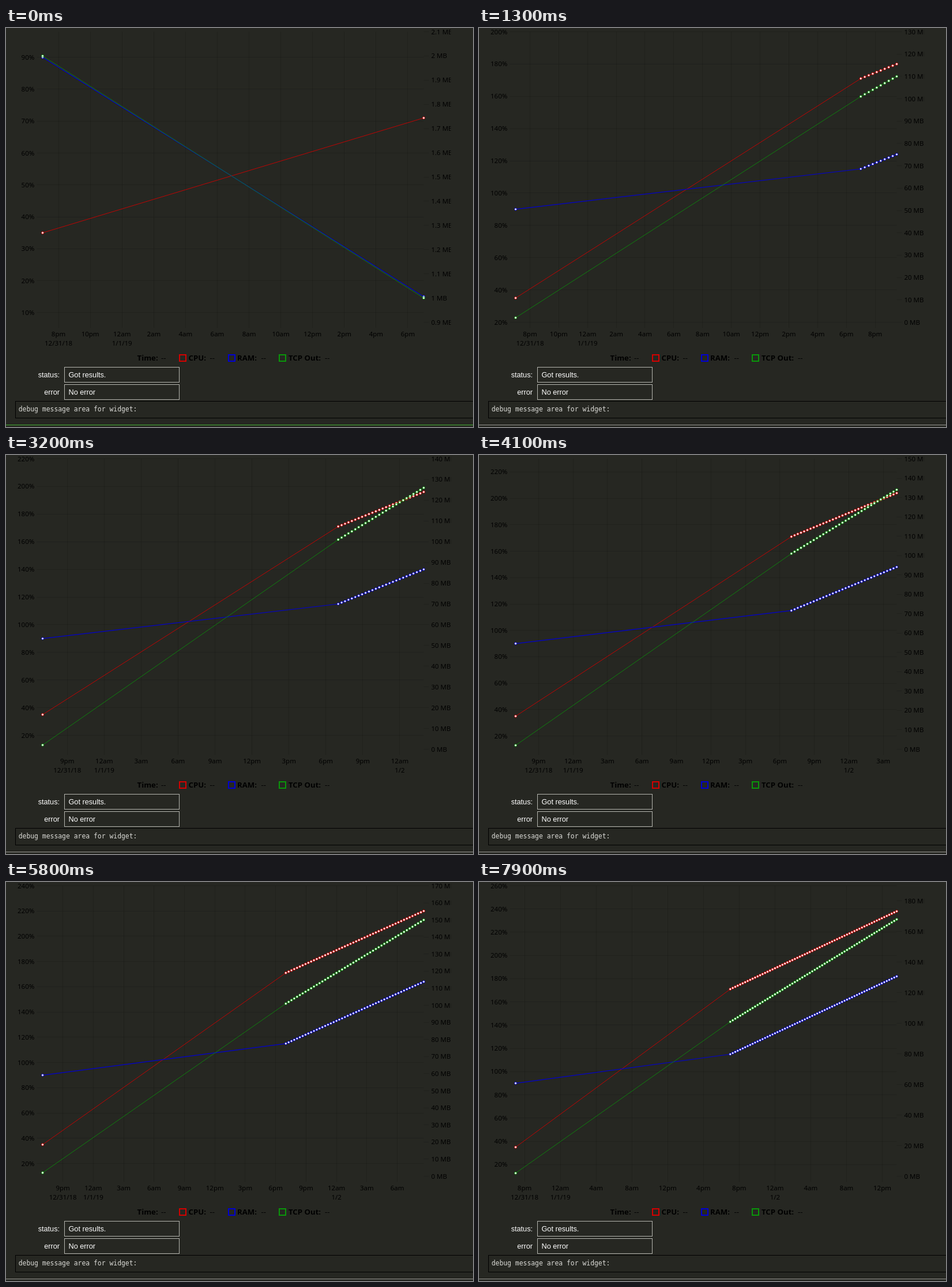
Write an HTML page with a canvas that moves like this. It is 810 px wide and 691 px high and loops after 8000 ms.

```html
<!DOCTYPE html>
<html lang="en">
<head>
<meta charset="utf-8">
<title>Streaming chart widget</title>
<style>
  html, body { margin: 0; width: 810px; height: 691px; overflow: hidden; background: #262722; }
  canvas, svg { position: absolute; left: 0; top: 0; display: block; }
  .legend text { font: bold 13.2px "Noto Sans", "Open Sans", sans-serif; fill: #000; }
  .legend text.val { font-weight: normal; }
  .legend rect { fill: none; stroke-width: 2; }
  .form text { font: 12.7px "Liberation Sans", Arial, sans-serif; fill: #fff; }
  .form rect { fill: none; stroke: #b4b4ae; }
  .debug { font: 11.4px "DejaVu Sans Mono", monospace; fill: #dcdcd8; }
</style>
</head>
<body>
<canvas id="chart" width="810" height="691"></canvas>
<svg width="810" height="691" viewBox="0 0 810 691">
  <g class="legend">
    <text x="227.5" y="575.5">Time:</text><text class="val" x="269" y="575.5">--</text>
    <rect x="301" y="566" width="11" height="11" stroke="#d40000"/>
    <text x="316.5" y="575.5">CPU:</text><text class="val" x="353.5" y="575.5">--</text>
    <rect x="386" y="566" width="11" height="11" stroke="#0000d4"/>
    <text x="401" y="575.5">RAM:</text><text class="val" x="442.5" y="575.5">--</text>
    <rect x="474" y="566" width="11" height="11" stroke="#0a960a"/>
    <text x="490" y="575.5">TCP Out:</text><text class="val" x="553" y="575.5">--</text>
  </g>
  <g class="form">
    <text x="93" y="604.5" text-anchor="end">status:</text>
    <rect x="101.5" y="587.5" width="199" height="26"/>
    <text x="108.5" y="604.5">Got results.</text>
    <text x="93" y="634.5" text-anchor="end">error</text>
    <rect x="101.5" y="617.5" width="199" height="26"/>
    <text x="108.5" y="634.5">No error</text>
  </g>
  <rect x="16.5" y="646.5" width="820" height="29" fill="none" stroke="#000"/>
  <text class="debug" x="21.7" y="663.5">debug message area for widget:</text>
</svg>
<script>
const ctx = document.getElementById("chart").getContext("2d");
const LOOP = 8000, TICK = 100;
const L = 63.5, R = 724.5, T = 6.5, B = 509.5, EDGE = 771.5;

// Ticks on which no sample, or two samples, arrive
const idle = new Set([6, 10, 14, 16, 23, 24, 29, 39, 42, 45, 49, 51, 61, 68, 70, 71, 78]);
const twice = new Set([15, 25, 43, 46, 50, 69, 72]);

const series = [
  { color: "#d00000", width: 0.9, first: 35, old: 71, start: 171, axis: "pct" },
  { color: "#0000d0", width: 1.2, first: 90, old: 15, start: 115, axis: "pct" },
  { color: "#0a960a", width: 0.8, first: 2, old: 1, start: 101, axis: "mb" }
];

function sampleCount(t) {
  let n = 0;
  for (let i = 2; i <= Math.floor(t / TICK); i++) {
    if (!idle.has(i)) n += twice.has(i) ? 2 : 1;
  }
  return n;
}

// Pad by a tenth and snap outward to a tenth of the magnitude
function padRange(vals) {
  const lo = Math.min(...vals), hi = Math.max(...vals), pad = (hi - lo) / 10;
  const step = Math.pow(10, Math.floor(Math.log10(hi - lo))) / 10;
  return [
    Math.max(0, Math.floor((lo - pad) / step + 1e-6) * step),
    Math.ceil((hi + pad) / step - 1e-6) * step
  ];
}

const pickStep = (steps, pxPerUnit, room) => steps.find(s => s * pxPerUnit >= room);

function line(x1, y1, x2, y2) {
  ctx.beginPath();
  ctx.moveTo(x1, y1);
  ctx.lineTo(x2, y2);
  ctx.stroke();
}

const crisp = v => Math.floor(v) + 0.5;

function makeScale([lo, hi]) {
  const k = (B - T) / (hi - lo);
  return { lo, hi, k, y: v => B - (v - lo) * k };
}

function eachTick(scale, draw) {
  const step = pickStep([0.1, 0.2, 0.5, 1, 2, 5, 10, 20, 50], scale.k, 29);
  const end = scale.hi / step + 1e-6;
  for (let i = Math.ceil(scale.lo / step - 1e-6); i <= end; i++) {
    draw(+(i * step).toFixed(1), scale.y(i * step));
  }
}

function drawTimeAxis(hours) {
  const k = (R - L) / hours, step = pickStep([1, 2, 3, 4, 6, 8], k, 47.7);
  const days = ["12/31/18", "1/1/19", "1/2"];
  let shown = -1;
  ctx.textAlign = "center";
  // Hours are counted from midnight; the data begin at 7pm
  for (let h = Math.ceil(19 / step) * step; h <= 19 + hours; h += step) {
    const x = L + (h - 19) * k, day = Math.floor(h / 24), clock = h % 24;
    line(crisp(x), T, crisp(x), B + 10);
    ctx.fillText((clock % 12 || 12) + (clock < 12 ? "am" : "pm"), x, 533.5);
    if (day !== shown) ctx.fillText(days[day], x, 550);
    shown = day;
  }
}

function drawSeries(s, points, xAt, scale) {
  ctx.strokeStyle = s.color;
  ctx.lineWidth = s.width;
  ctx.beginPath();
  for (const [h, v] of points) ctx.lineTo(xAt(h), scale.y(v));
  ctx.stroke();
  ctx.fillStyle = "#fff";
  ctx.lineWidth = 1;
  for (const [h, v] of points) {
    ctx.beginPath();
    ctx.arc(xAt(h), scale.y(v), 2, 0, Math.PI * 2);
    ctx.fill();
    ctx.stroke();
  }
}

function drawFooter(lit) {
  ctx.fillStyle = lit ? "#1c3216" : "#20211d";
  ctx.fillRect(0, 686, 810, 3);
  ctx.fillStyle = lit ? "#55a046" : "#a2a29c";
  ctx.fillRect(0, 687, 810, 1);
}

function draw(t) {
  const n = sampleCount(t);
  const hours = 24 + Math.max(0, n - 1) / 3.6;
  const xAt = h => L + h / hours * (R - L);
  const data = series.map(s => {
    const pts = [[0, s.first]];
    if (!n) pts.push([24, s.old]);
    for (let i = 0; i < n; i++) pts.push([24 + i / 3.6, s.start + i]);
    return pts;
  });
  const scaleFor = axis => makeScale(padRange(
    data.filter((_, i) => series[i].axis === axis).flat().map(p => p[1])));
  const scales = { pct: scaleFor("pct"), mb: scaleFor("mb") };

  ctx.fillStyle = "#262722";
  ctx.fillRect(0, 0, 810, 691);
  drawFooter(t < TICK);

  ctx.save();
  ctx.beginPath();
  ctx.rect(0, 0, EDGE, 560);
  ctx.clip();
  ctx.font = '11.5px "Noto Sans", "Open Sans", sans-serif';
  ctx.fillStyle = "#000";
  ctx.strokeStyle = "rgba(0,0,0,0.15)";
  ctx.lineWidth = 1;
  drawTimeAxis(hours);
  ctx.textAlign = "right";
  eachTick(scales.pct, (v, y) => {
    line(L - 10, crisp(y), R, crisp(y));
    ctx.fillText(v + "%", 49.3, y + 4);
  });
  ctx.textAlign = "left";
  eachTick(scales.mb, (v, y) => {
    line(R, crisp(y), R + 9, crisp(y));
    ctx.fillText(v + " MB", 737.4, y + 4);
  });
  series.forEach((s, i) => drawSeries(s, data[i], xAt, scales[s.axis]));
  ctx.restore();
}

function frame() {
  draw(performance.now() % LOOP);
  requestAnimationFrame(frame);
}
frame();
</script>
</body>
</html>
```
